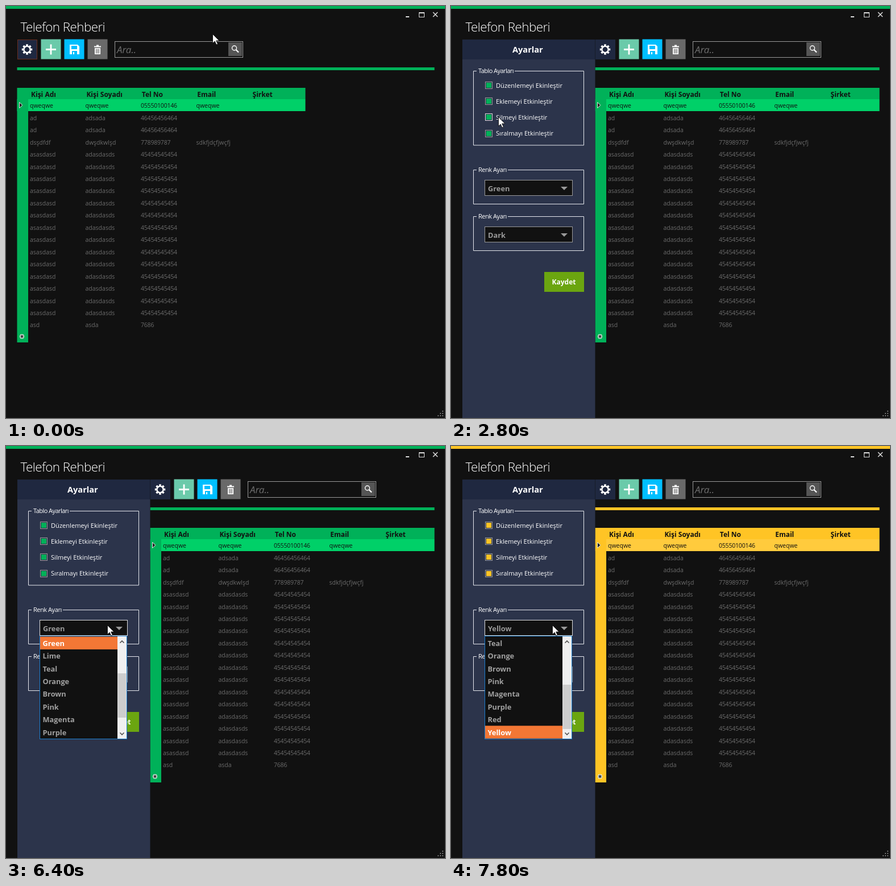
Animation of 772 by 725 pixels, one loop 8000 ms. Source, as an HTML page:

```html
<!DOCTYPE html>
<html lang="tr">
<head>
<meta charset="utf-8">
<title>Telefon Rehberi</title>
<style>
html, body { margin: 0; width: 100%; height: 100%; overflow: hidden; background: #111; }
svg { display: block; }
text { font-family: "Open Sans", "Noto Sans", sans-serif; white-space: pre; }
</style>
</head>
<body>
<svg id="stage" width="772" height="725" viewBox="0 0 772 725"></svg>
<script>
const LOOP = 8000, TICK = 200, OPEN = 234;
const stage = document.getElementById('stage');

// name, accent, selected row
const styles = [
  ['Green', '#00b159', '#00d068'], ['Lime', '#8ebc00', '#a6db00'],
  ['Teal', '#00aaad', '#00c9cd'], ['Orange', '#f37735', '#f58b52'],
  ['Brown', '#a55100', '#c46000'], ['Pink', '#e771bd', '#ea7cc3'],
  ['Magenta', '#ff0094', '#ff2fa7'], ['Purple', '#7c4199', '#934db5'],
  ['Red', '#d11141', '#ec1f52'], ['Yellow', '#ffc425', '#ffcb3d']
];
const heads = ['Kişi Adı', 'Kişi Soyadı', 'Tel No', 'Email', 'Şirket'];
const people = [
  ['qweqwe', 'qweqwe', '05550100146', 'qweqwe'],
  ['ad', 'adsada', '46456456464'],
  ['ad', 'adsada', '46456456464'],
  ['dsşdfdf', 'dwşdkwlşd', '778989787', 'sdkfjdçfjwçfj'],
  ...Array(14).fill(['asasdasd', 'adasdasds', '45454545454']),
  ['asd', 'asda', '7686']
];
// label, time switched off, time switched on
const checks = [
  ['Düzenlemeyi Ekinleştir', 4600, 5000], ['Eklemeyi Etkinleştir', 4200, 5200],
  ['Silmeyi Etkinleştir', 3800, 5400], ['Sıralmayı Etkinleştir', 3400, 5600]
];
// time, x, y
const pointer = [
  [0, 363, 49], [400, 230, 62], [800, 90, 76], [1100, 38, 78], [1400, 39, 77],
  [1800, 109, 55], [2200, 125, 100], [2600, 90, 180], [2800, 83, 195],
  [3100, 68, 223], [3400, 68, 223], [3800, 68, 195], [4200, 68, 167],
  [4600, 70, 139], [5000, 70, 139], [5200, 69, 167], [5400, 68, 195],
  [5600, 68, 223], [6100, 178, 315], [8000, 178, 315]
];

const rect = (x, y, w, h, fill, more = '') =>
  `<rect x="${x}" y="${y}" width="${w}" height="${h}" fill="${fill}" ${more}/>`;
const frame = (x, y, w, h, stroke, fill = 'none') =>
  rect(x + .5, y + .5, w - 1, h - 1, fill, `stroke="${stroke}"`);
const path = (d, fill, more = '') => `<path d="${d}" fill="${fill}" ${more}/>`;
const line = (d, stroke, w = 1) => path(d, 'none', `stroke="${stroke}" stroke-width="${w}"`);
const text = (x, y, s, size, fill, weight = 400, more = '') =>
  `<text x="${x}" y="${y}" font-size="${size}" fill="${fill}" font-weight="${weight}" ${more}>${s}</text>`;
const shift = (x, y, s) => `<g transform="translate(${x} ${y})">${s}</g>`;

function pointerAt(t) {
  const i = pointer.findIndex(p => p[0] > t);
  const [a, b] = [pointer[i - 1], pointer[i]];
  const k = (t - a[0]) / (b[0] - a[0]);
  return [1, 2].map(j => Math.round(a[j] + (b[j] - a[j]) * k));
}

function windowBar(accent) {
  let s = rect(0, 0, 772, 5, accent);
  s += text(25.5, 45, 'Telefon Rehberi', 22.4, '#fff', 300, 'letter-spacing="-.55"');
  s += rect(703, 18, 6, 2, '#ddd') + frame(726, 11, 10, 9, '#ddd') + rect(726, 11, 10, 2, '#ddd');
  s += line('M751 11l8 8m0-8l-8 8', '#ddd', 1.5);
  for (let i = 0; i < 3; i++)
    for (let j = 0; j <= i; j++) s += rect(767 - j * 4, 712 + i * 4, 2, 2, '#6d6d6d');
  return s;
}

function gear() {
  let s = '<circle r="5.6" fill="none" stroke="#fff" stroke-width="2.4"/>';
  for (let a = 0; a < 360; a += 45) s += rect(-1.8, -9.2, 3.6, 3.6, '#fff', `transform="rotate(${a})"`);
  return s;
}

function toolbar(closed) {
  let s = rect(20, 59, 35, 35, '#1f2840');
  if (closed) s += frame(20, 59, 35, 35, '#6b2d1f');
  s += shift(37, 76.5, gear());
  s += rect(61.5, 58.5, 35, 35, '#6bcaaa') + line('M70 76.5h18m-9-9v18', '#fff', 2.8);
  s += rect(102.5, 58.5, 35, 35, '#00bfff');
  s += path('M112 68h14l3 3v14h-17zM115 70v6h10v-6zM116 79v6h2v-4h2v4h5v-6z', '#fff', 'fill-rule="evenodd"');
  s += rect(143.5, 58.5, 35, 35, '#696969');
  s += path('M155 70.5h4v-2h4v2h4v2h-12zM156 74h10v11h-10zM158 75.5v8h1.2v-8zM160.4 75.5v8h1.2v-8zM162.8 75.5v8h1.2v-8z',
    '#fff', 'fill-rule="evenodd"');
  s += frame(191, 62, 226, 29, '#999') + rect(391, 64, 24, 24, '#555');
  s += text(195, 83, 'Ara..', 17, '#6d6d6d', 400, 'font-style="italic"');
  s += '<circle cx="401.5" cy="74" r="4" fill="none" stroke="#fff" stroke-width="1.4"/>';
  return s + line('M404.5 77l4.5 4.5', '#fff', 2.2);
}

function grid(accent, row, canAdd) {
  let s = rect(19.5, 144, 507, 20, accent) + rect(19.5, 164, 507, 21, row);
  s += rect(19.5, 164, 19.5, canAdd ? 428 : 407, accent);
  heads.forEach((h, i) => s += text(44 + i * 97.4, 159.5, h, 12, '#111', 700));
  people.forEach((p, i) => p.forEach((v, j) =>
    s += text(42 + j * 97.5, 179.3 + i * 21.45, v, 10.5, i ? '#6b6b6b' : '#111', 400,
      j === 2 ? 'letter-spacing="-.2"' : '')));
  s += path('M23.5 169.5v10l5.5-5z', '#222', 'stroke="#e4e4e4"');
  if (canAdd) {
    s += '<circle cx="28" cy="581.5" r="4" fill="#e8f0ea"/>';
    s += line('M28 578.5v6m-2.7-4.5l5.4 3m0-3l-5.4 3', '#222', 1.3);
  }
  return s;
}

function group(y, h, title, gap, spacing) {
  return line(`M45 ${y + .5}H39.5v${h}H233.5V${y + .5}H${gap}`, '#e6e8ee') +
    text(48, y + 4, title, 11, '#fff', 400, `letter-spacing="${spacing}"`);
}

function combo(y, value, border = '#999') {
  return frame(59, y, 155, 28, border, '#111') + text(65, y + 19.5, value, 12.8, '#999', 700) +
    path(`M193 ${y + 12}h12l-6 6z`, '#999');
}

function panel(t, dx, accent, name, px, py) {
  let s = rect(20, 94, 234, 631, '#2c344b') + rect(20, 59, 234, 35, '#1f2840');
  s += text(108, 82, 'Ayarlar', 14.6, '#fff', 700);
  s += group(114, 130.5, 'Tablo Ayarları', 112, -.55);
  checks.forEach(([label, off, on], i) => {
    const y = 133 + i * 28.2;
    const hover = dx === OPEN && px > 60 && px < 200 && Math.abs(py - y - 6) < 10;
    s += frame(60, Math.round(y), 13, 13, hover ? '#e0e0e0' : '#999');
    if (i === 0 && t === off) {
      s += rect(62, 135, 9, 9, '#17699e') + frame(75, 131, 138, 16, '#1c2336');
    } else if (t < off || t >= on) {
      s += rect(62, Math.round(y) + 2, 9, 9, accent);
    }
    s += text(79, y + 10.5, label, 11.1, '#fff');
  });
  const listOpen = t >= 6200;
  if (dx === OPEN) s += group(288, 60, 'Renk Ayarı', 100, -.45);
  s += combo(306, name, listOpen ? '#ddd' : '#999');
  s += group(370, 60, 'Renk Ayarı', 100, -.45) + combo(388, 'Dark');
  s += rect(164, 468, 70, 35, '#6ba510') + text(177.5, 489.5, 'Kaydet', 12, '#fff', 700);
  return s;
}

function dropList(index) {
  const top = Math.max(0, index - 7);
  let s = frame(59, 334, 154, 182, '#1c7fd0', '#111');
  styles.slice(top, top + 8).forEach(([name], i) => {
    const y = 335.5 + i * 22.4, on = top + i === index;
    if (on) s += rect(60, y, 136, 22.4, '#f37735');
    s += text(64.5, y + 16.3, name, 12.8, on ? '#fff' : '#a0a0a0', 700);
  });
  s += rect(196, 335, 16, 180, '#f0f0f0') + rect(196.5, 400 + top * 10, 15, 78, '#cdcdcd');
  return s + line('M200.5 346.5l3.5-3.5 3.5 3.5M200.5 504.5l3.5 3.5 3.5-3.5', '#505050', 1.6);
}

function draw(t) {
  const dx = Math.min(OPEN, Math.max(0, (t - 1300) * .339));
  const index = Math.max(0, Math.floor((t - 6400) / 155));
  const [name, accent, row] = styles[index];
  const [px, py] = pointerAt(t);
  const canAdd = t < checks[1][1] || t >= checks[1][2];
  let s = rect(0, 0, 772, 725, '#111') + windowBar(accent);
  s += rect(19.5 + dx, 108, 734 - dx, 5, accent);
  s += `<svg width="753.5" height="725">${shift(dx, 0, grid(accent, row, canAdd))}</svg>`;
  s += shift(dx, 0, toolbar(dx === 0));
  if (dx > 0) {
    const body = panel(t, dx, accent, name, px, py);
    s += `<svg x="19.5" width="${dx}" height="725">${shift(dx - OPEN - 19.5, 0, body)}</svg>`;
  }
  if (t >= 6200) s += dropList(index);
  s += shift(px, py, path('M.5.5v16l3.7-3.5 2.7 6 2.5-1.1-2.7-5.9h5.2z', '#fff', 'stroke="#111" stroke-width=".9"'));
  stage.innerHTML = s;
}

let last = -1;
function tick(now) {
  const t = Math.floor(now % LOOP / TICK) * TICK;
  if (t !== last) draw(last = t);
  requestAnimationFrame(tick);
}
draw(0);
requestAnimationFrame(tick);
</script>
</body>
</html>
```
